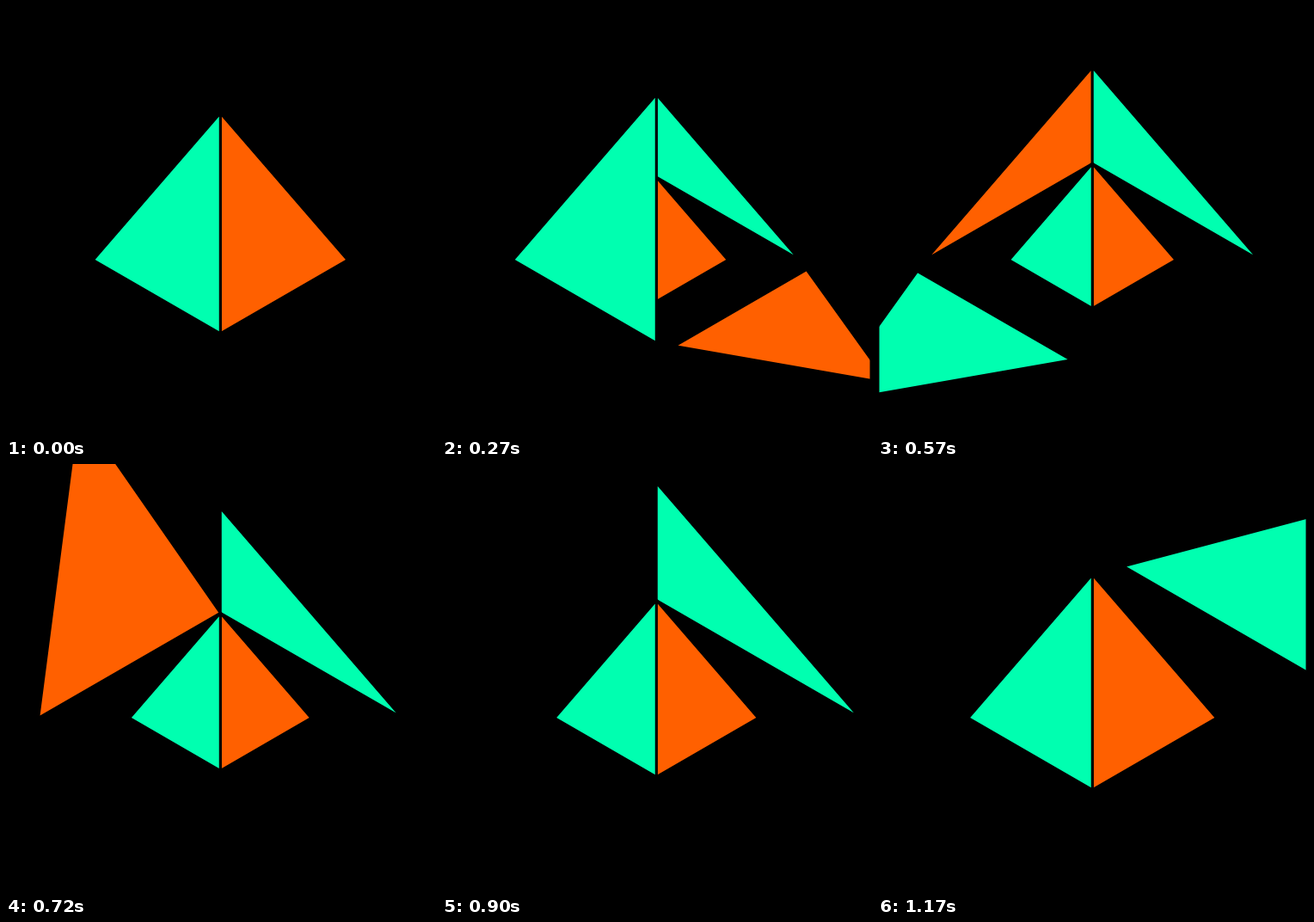
Animation, 500 px wide and 500 px high, one loop 1.2 s. Source, as an HTML page with a canvas:

```html
<!DOCTYPE html>
<html lang="en">
<head>
<meta charset="utf-8">
<title>Unfolding pyramid</title>
<style>
  html, body { margin: 0; width: 100%; height: 100%; overflow: hidden; background: #000; }
  canvas { display: block; width: 500px; height: 500px; }
</style>
</head>
<body>
<canvas id="stage" width="500" height="500"></canvas>
<script>
const ctx = document.getElementById('stage').getContext('2d');
const LOOP = 1200, STEP = 30;
const CX = 249.25, CY = 295.4, SIDE = 171;
const MINT = '#00ffb0', ORANGE = '#ff6000';
const COS30 = Math.sqrt(3) / 2;
const SLANT = Math.sqrt(1.25);              // face height for a unit base and unit pyramid height
const CLOSED = Math.PI - Math.atan(2);      // face angle measured from the outward ground direction

// Outward ground direction of each face, in opening order.
const FACES = [
  { dir: [1, 0], color: ORANGE },
  { dir: [0, 1], color: MINT },
  { dir: [-1, 0], color: ORANGE },
  { dir: [0, -1], color: MINT }
];

const clamp = x => Math.min(1, Math.max(0, x));
const smooth = x => x * x * (3 - 2 * x);

// Isometric projection of ground coordinates (x, y) and height z.
const project = (x, y, z, size) => [
  CX + (x - y) * COS30 * size,
  CY + ((x + y) / 2 - z) * size
];

function drawFace({ dir: [dx, dy], color }, open, size) {
  if (open >= 1) return;
  const angle = CLOSED * (1 - smooth(open));
  const shrink = Math.pow(clamp((open - 0.75) / 0.25), 5);
  const out = 0.5 + SLANT * Math.cos(angle);
  const tip = [dx * out, dy * out, SLANT * Math.sin(angle)];
  const corner = side => [(dx - dy * side) / 2, (dy + dx * side) / 2, 0]
    .map((v, i) => v + (tip[i] - v) * shrink);

  ctx.beginPath();
  for (const p of [tip, corner(1), corner(-1)]) ctx.lineTo(...project(...p, size));
  ctx.closePath();
  ctx.fillStyle = color;
  ctx.fill();
  ctx.stroke();
}

function draw(time) {
  const p = time / LOOP;
  const inner = SIDE / (2 - p), outer = 2 * inner;
  const petal = i => drawFace(FACES[i], clamp(p * 4 - i), outer);

  ctx.fillStyle = '#000';
  ctx.fillRect(0, 0, 500, 500);
  ctx.strokeStyle = '#000';
  ctx.lineWidth = 3;
  ctx.lineJoin = 'round';

  petal(2);
  petal(3);
  [2, 3, 0, 1].forEach(i => drawFace(FACES[i], 0, inner));
  petal(0);
  petal(1);

  ctx.fillStyle = '#000';
  ctx.fillRect(0, 0, 1.5, 500);
  ctx.fillRect(497.5, 0, 2.5, 500);
}

const start = performance.now();
function tick() {
  const time = (performance.now() - start) % LOOP;
  draw(Math.floor(time / STEP) * STEP);
  requestAnimationFrame(tick);
}
tick();
</script>
</body>
</html>
```
